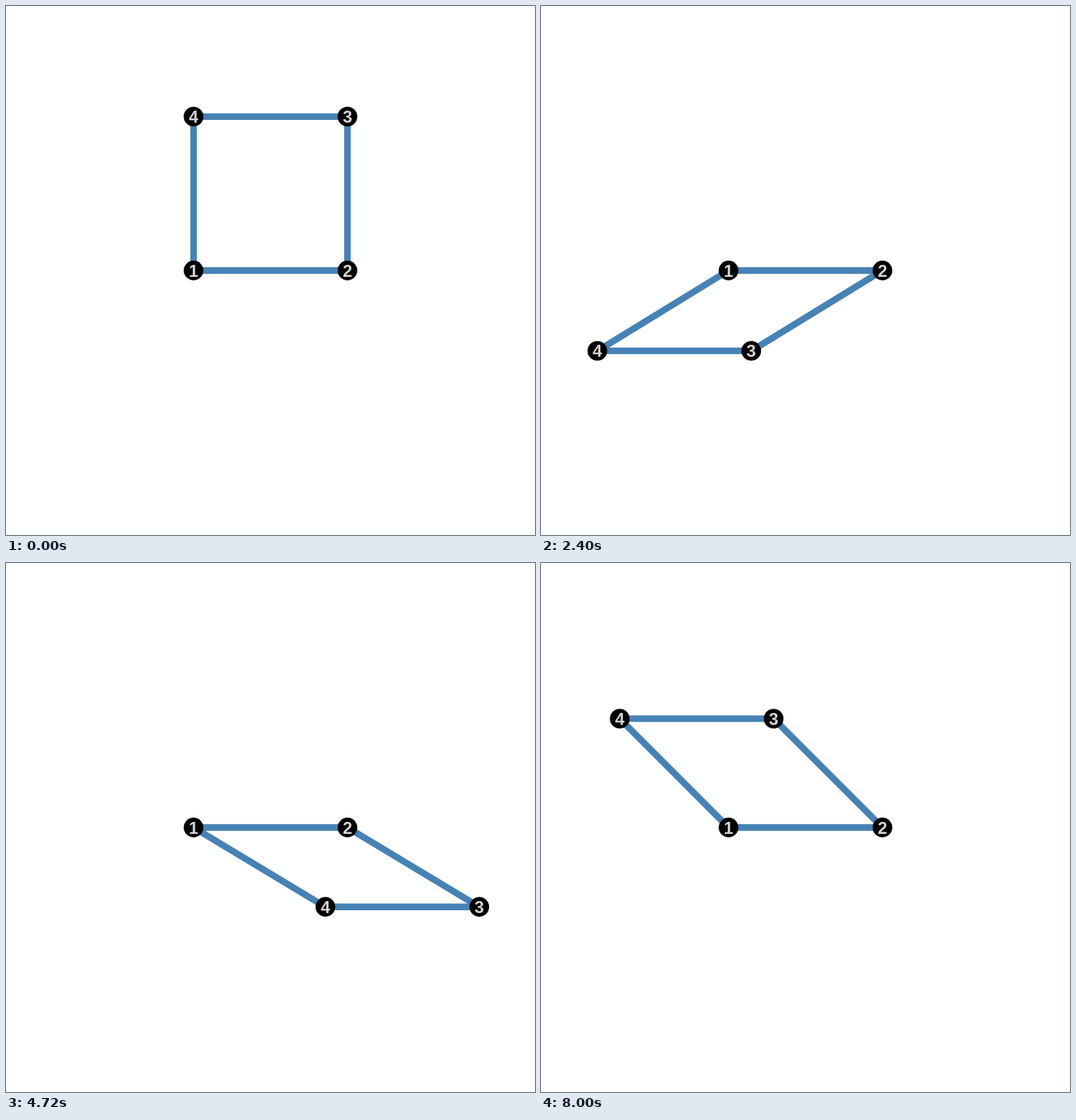
Write an HTML page that moves like this. It is 748 by 748 pixels and loops after 8040 ms.

```html
<!DOCTYPE html>
<html>
<head>
<meta charset="utf-8">
<style>
html, body { margin: 0; width: 100%; height: 100%; overflow: hidden; background: #fff; }
svg { display: block; }
path { fill: none; stroke: #4682b4; stroke-width: 9.3; }
text { fill: #d3d3d3; font: bold 24px "Liberation Sans", Arial, sans-serif; text-anchor: middle; }
</style>
</head>
<body>
<svg width="748" height="748" viewBox="0 0 748 748">
  <path stroke-linejoin="round"/>
  <g><circle r="13.9"/><text y="8.6">1</text></g>
  <g><circle r="13.9"/><text y="8.6">2</text></g>
  <g><circle r="13.9"/><text y="8.6">3</text></g>
  <g><circle r="13.9"/><text y="8.6">4</text></g>
</svg>
<script>
const SIDE = 217.6, LEFT = 265.2, BASE = 374;
const STEP = 40, COUNT = 201;
const bars = document.querySelector('path');
const joints = document.querySelectorAll('g');

function draw(ms) {
  // The crank turns from 90° by 405° over the loop, then jumps back.
  const step = Math.floor(ms / STEP) % COUNT;
  const angle = (90 + 405 * step / (COUNT - 1)) * Math.PI / 180;
  const x = LEFT + SIDE * Math.cos(angle);
  const y = BASE - SIDE * Math.sin(angle);
  const points = [[LEFT, BASE], [LEFT + SIDE, BASE], [x + SIDE, y], [x, y]];
  bars.setAttribute('d', 'M' + points.join('L') + 'Z');
  joints.forEach((joint, i) => joint.setAttribute('transform', `translate(${points[i]})`));
}

const start = performance.now();
function tick() {
  draw(performance.now() - start);
  requestAnimationFrame(tick);
}
tick();
</script>
</body>
</html>
```
